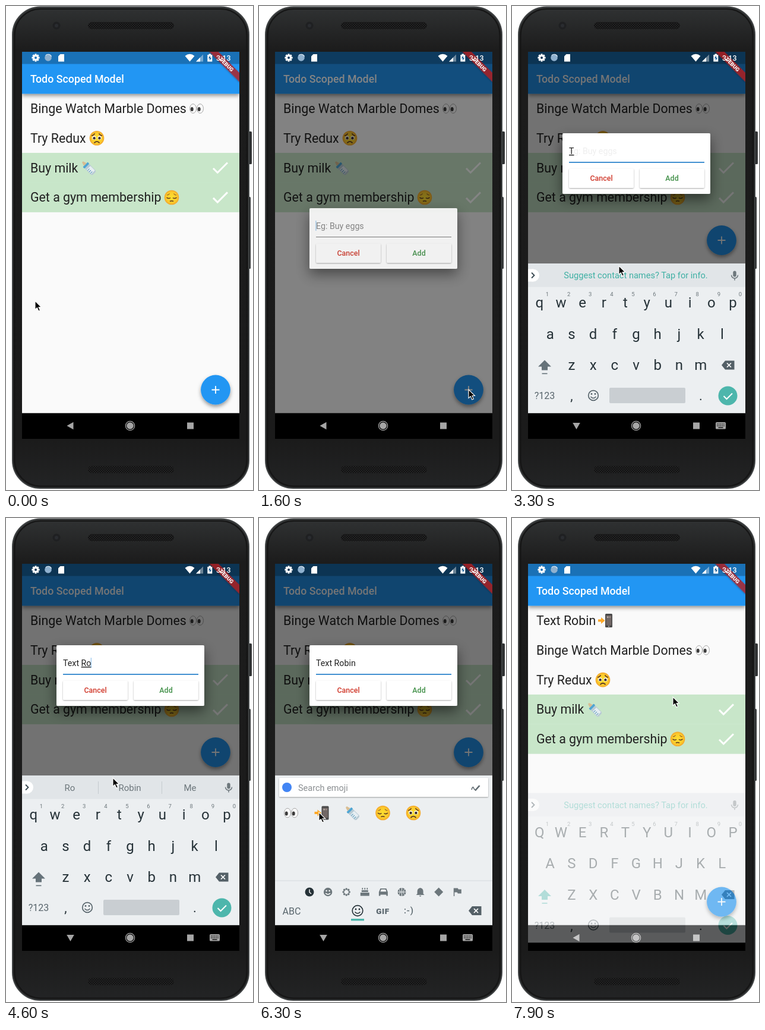
Write an HTML page that moves like this. It is 416 px wide and 814 px high and loops after 8 s.

```html
<!DOCTYPE html>
<html lang="en">
<head>
<meta charset="utf-8">
<title>Todo app</title>
<style>
html, body { margin: 0; width: 100%; height: 100%; overflow: hidden; background: #fff; }
svg { display: block; width: 416px; height: 814px; font-family: Roboto, sans-serif; }
text { white-space: pre; }
.mid { text-anchor: middle; }
.bold { font-weight: 500; }
</style>
</head>
<body>
<svg id="stage" viewBox="0 0 416 814" xmlns="http://www.w3.org/2000/svg"></svg>
<script>
const LOOP = 8000;
const NAME = 'Robin';
const ROW = 49.82;
const KEYS_Y = [507, 559.5, 612];
const INK = '#263238';
const GREY = '#6d777c';

const label = (x, y, size, fill, str, extra = '') =>
  `<text x="${x}" y="${y}" font-size="${size}" fill="${fill}" ${extra}>${str}</text>`;
const rect = (x, y, w, h, fill, extra = '') =>
  `<rect x="${x}" y="${y}" width="${w}" height="${h}" fill="${fill}" ${extra}/>`;
const disc = (x, y, r, fill, extra = '') =>
  `<circle cx="${x}" cy="${y}" r="${r}" fill="${fill}" ${extra}/>`;
const line = (d, color, width, extra = '') =>
  `<path d="${d}" fill="none" stroke="${color}" stroke-width="${width}" ${extra}/>`;
const shape = (d, fill, extra = '') => `<path d="${d}" fill="${fill}" ${extra}/>`;
const at = (x, y, body, scale = 1) => `<g transform="translate(${x} ${y}) scale(${scale})">${body}</g>`;
const group = (id, body, extra = '') => `<g id="${id}" ${extra}>${body}</g>`;
const mid = 'class="mid"';

// Emoji, each about 24 px wide around its own centre
const face = disc(0, 0, 12.3, 'url(#skin)');
const eyeball = x => `<ellipse cx="${x}" rx="5.5" ry="7.8" fill="#fafafa" stroke="#a8a8a8" stroke-width="1"/>
  <ellipse cx="${x - 1.8}" cy="1" rx="2.5" ry="3.5" fill="#3b3b3b"/>`;
const emoji = {
  eyes: eyeball(-6) + eyeball(6),
  worried: face + disc(-4.6, -.5, 3.2, '#fff') + disc(4.6, -.5, 3.2, '#fff') + disc(-4.4, 0, 2.2, '#402f2c')
    + disc(4.4, 0, 2.2, '#402f2c') + line('M-9-4 Q-5-5-3.5-8 M9-4 Q5-5 3.5-8', '#6d4022', 1.6)
    + line('M-4.5 8 Q0 3.2 4.5 8', '#5b3a24', 1.9),
  pensive: face + line('M-8.5 0 Q-5 3-2 .5 M8.5 0 Q5 3 2 .5', '#5b3a24', 1.5)
    + line('M-8-4 Q-5-4-3.5-6.5 M8-4 Q5-4 3.5-6.5', '#8d5a24', 1.1) + line('M-3 6.5 Q0 5 3 6.5', '#5b3a24', 1.6),
  bottle: '<g transform="rotate(-45) scale(1.12)">' + rect(-4.8, -5, 9.6, 17, '#b9cbd4', 'rx="3"')
    + rect(-4, 0, 8, 9.5, '#e6eef2') + rect(-5.2, -7, 10.4, 3.5, '#4fa5d3', 'rx="1"')
    + shape('M-3-7 Q-2-9-1.5-12 Q0-14 1.5-12 Q2-9 3-7Z', '#d8bd92')
    + line('M-4 2h4M-4 5h4M-4 8h4', '#5f9cbc', 1) + '</g>',
  phone: rect(0, -11.5, 12, 23, '#4a4a4a', 'rx="1.5"') + rect(1.5, -8.5, 9, 16.5, '#716765')
    + rect(3, -7, 2.5, 2.5, '#b5a9a2') + rect(6.5, -7, 2.5, 2.5, '#968984')
    + disc(6, 9.7, 1, '#bbb') + shape('M-12-2h5v-3.5l6.5 5.5-6.5 5.5v-3.5h-5z', '#fda928')
};

const gear = Array.from({ length: 8 }, (_, i) => rect(-1.5, -6.6, 3, 4, '#fff', `transform="rotate(${i * 45})"`)).join('')
  + `<circle r="3.5" fill="none" stroke="#fff" stroke-width="3"/>`;

const smiley = (color, r = 8.3) => `<circle r="${r}" fill="none" stroke="${color}" stroke-width="1.7"/>`
  + disc(-3, -2.5, 1.4, color) + disc(3, -2.5, 1.4, color) + line('M-4.5 2 Q0 7 4.5 2', color, 1.6);

const backspace = shape('M-11 0 L-5-7.5 H10.5 V7.5 H-5Z', '#546067') + line('M-2-3.5 L5 3.5 M5-3.5 L-2 3.5', '#fff', 1.7);
const tickMark = shape('M-3.2 3.9L-7.4-.3-8.8 1.1-3.2 6.7 8.8-5.3 7.4-6.7z', '#fff');

const todo = ([str, icon, x, done], i) => at(0, i * ROW,
  (done ? rect(27, 147.4, 366, 50, '#c8e6c9') : '') + label(41, 180, 21.35, '#212121', str)
  + at(x, 172.5, emoji[icon]) + (done ? at(361, 172.8, tickMark, 1.48) : ''));

const todos = [
  ['Binge Watch Marble Domes', 'eyes', 321],
  ['Try Redux', 'worried', 153],
  ['Buy milk', 'bottle', 139, true],
  ['Get a gym membership', 'pensive', 279, true]
];

const phoneBody = rect(408, 211, 6, 55, '#303233', 'rx="1.5"') + rect(408, 321, 4, 121, '#303233', 'rx="1.5"')
  + rect(11, 1.5, 398, 809.5, 'url(#case)', 'rx="47" stroke="#404344" stroke-width="2"')
  + rect(14.5, 5, 391, 802.5, 'none', 'rx="44" stroke="#151515" stroke-width="2"')
  + disc(85, 33, 6.5, '#1f2022') + disc(85, 33, 3, '#2a2c30')
  + rect(138, 27, 145, 12, 'url(#grille)', 'rx="6"') + rect(138, 773.5, 145, 12, 'url(#grille)', 'rx="6"');

const fab = disc(353, 645.5, 24.9, '#2196f3', 'filter="url(#lift)"') + line('M353 639v13M346.5 645.5h13', '#fff', 1.8);

const button = (x, str, color) => rect(x, 59.5, 109, 32.5, '#fff', 'rx="2" filter="url(#low)"')
  + label(x + 54.5, 80, 12.45, color, str, 'class="mid bold"');

const dialog = rect(85, 0, 249, 102, '#fff', 'rx="2" filter="url(#high)"')
  + label(96, 35, 14.23, '#858585', 'Eg: Buy eggs', 'id="hint"')
  + '<text x="96" y="35" font-size="14.23" fill="#212121"><tspan id="plain"></tspan><tspan id="composing" text-decoration="underline"></tspan></text>'
  + group('fieldEmoji', at(174, 30, emoji.phone, .66))
  + rect(95.3, 21, 1.2, 17, '#4d9de0', 'id="caret"')
  + rect(96, 48, 228, 1, '#777', 'id="underline"')
  + button(96, 'Cancel', '#d0392b') + button(215, 'Add', '#43914a');

const banner = `<g transform="translate(393 77) rotate(45)">`
  + rect(-36, 24.9, 72, 10.7, '#b71c1c', 'opacity=".8" filter="url(#low)"')
  + label(0, 33.5, 9, '#fff', 'DEBUG', 'class="mid" font-weight="900"') + '</g>';

const statusIcons = at(50, 87, gear) + disc(71, 87, 5.8, '#8fb1cf') + line('M66.5 83.5 A5.8 5.8 0 0 1 76.5 85', '#dce8f3', 1.2)
  + shape('M91.5 81h6.5v12.5h-10v-9z', '#fff')
  + shape('M301.5 84 Q309.5 77.5 317.5 84 L309.5 93.5Z', '#fff')
  + shape('M332 81.5v12h-12z', '#fff', 'opacity=".4"') + shape('M327 86.5v7h-7z', '#fff')
  + shape('M341.5 80.5h3.5v1.5h2.3v11.5h-8v-11.5h2.2z', '#fff') + shape('M344 83l-3 5h2v4l3-5h-2z', '#1b5e97')
  + label(354, 91.7, 12.45, '#fff', '3:13', 'class="bold"');

const keyRow = (chars, x, row) => [...chars].map((c, i) =>
  label(x + i * 36.2, KEYS_Y[row], 24, INK, c, mid)).join('');
const letters = convert => keyRow(convert('qwertyuiop'), 46.2, 0) + keyRow(convert('asdfghjkl'), 64.2, 1)
  + keyRow(convert('zxcvbnm'), 100.5, 2);
const shift = color => shape('M55 595.5l11 11h-6v6h-10v-6h-6z', color) + rect(50.5, 617.5, 9, 1.6, color);
const digits = [...'1234567890'].map((c, i) => label(59.5 + i * 36.1, 488, 9.5, GREY, c, mid)).join('');

const strip = rect(27, 433, 366, 39.5, '#e1e5e8') + disc(35.5, 453, 10.5, '#fff') + rect(27, 442.5, 9, 21, '#fff')
  + line('M33 448.5l4.5 4.5-4.5 4.5', '#37474f', 1.8)
  + label(208.5, 458.3, 14.6, '#3fb0a4', 'Suggest contact names? Tap for info.', 'id="notice" class="mid"')
  + group('words', [107.5, 208.5, 310].map(x => label(x, 458.5, 15, GREY, '', mid)).join('')
    + rect(155, 443, 1, 21, '#c5cbcf') + rect(262, 443, 1, 21, '#c5cbcf'))
  + rect(372.3, 445.5, 5.4, 10, GREY, 'rx="2.7"') + line('M369.5 452.5a5.5 5.5 0 0 0 11 0M375 458v3.5', GREY, 1.5);

const alphabet = strip + digits
  + group('upper', letters(s => s.toUpperCase()) + shift('#3fb0a4'))
  + group('lower', letters(s => s) + shift('#66737a'))
  + at(364, 604, backspace)
  + label(55, 661, 16, '#59666d', '?123', mid) + label(100.5, 663, 22, INK, ',', mid) + label(318, 663, 22, INK, '.', mid)
  + at(137, 655, smiley('#59666d')) + rect(164, 642, 128, 26, '#c9ced2', 'rx="2"')
  + disc(363.5, 655.5, 16, '#4db6ac') + line('M356.5 656l5 5 9.5-9.5', '#fff', 2);

const petals = Array.from({ length: 8 }, (_, i) => disc(0, -5, 1.8, GREY, `transform="rotate(${i * 45})"`)).join('');
const categories = [
  disc(0, 0, 7.5, INK) + line('M0-4.5V.5l3 2.5', '#fff', 1.4),
  disc(0, 0, 7.2, GREY) + disc(-2.5, -2, 1.2, '#fff') + disc(2.5, -2, 1.2, '#fff') + line('M-4 2Q0 6 4 2', '#fff', 1.4),
  petals,
  rect(-7.5, 1, 15, 5.5, GREY) + rect(-5.5, -3, 11, 3, GREY) + line('M-4-7v3M0-7v3M4-7v3', GREY, 1.6),
  shape('M-7.5 6.5V0l2.5-6H5l2.5 6v6.5H5V4.5H-5v2z', GREY) + shape('M-5-.7l1.5-3.6h7L5-.7z', '#fff'),
  disc(0, 0, 7, GREY) + line('M-7 0H7M0-7V7M-5-5Q0 0-5 5M5-5Q0 0 5 5', '#eceff1', 1),
  shape('M-7 5l2-2v-4q0-5 5-6q5 1 5 6v4l2 2zM-2 6h4l-2 2z', GREY),
  shape('M0-7.5L7.5 0 0 7.5-7.5 0z', GREY),
  shape('M-6-6.5H1l1 2h5v7H1l-1-2h-4.5v6.5H-6z', GREY)
];

const emojiPanel = rect(34, 437, 352, 32, '#fff', 'rx="1.5" filter="url(#low)"') + disc(47, 453, 8, '#4285f4')
  + label(66, 458.5, 14.5, '#8b8f92', 'Search emoji')
  + line('M358 457q2-7 3.5-3t2.5 2', '#5f6a70', 1.6) + line('M364 458.5l7.5-8.5', '#5f6a70', 2.6)
  + ['eyes', 'phone', 'bottle', 'pensive', 'worried'].map((e, i) => at(54 + i * 51.5, 496, emoji[e])).join('')
  + rect(27, 609.5, 366, 1, '#d5dade') + categories.map((c, i) => at(85 + i * 31.1, 629, c)).join('')
  + label(55, 667, 16, '#59666d', 'ABC', mid) + at(166, 660.5, smiley(INK, 8.8)) + rect(155, 674, 22, 3.4, '#4db6ac')
  + label(208.5, 665.5, 13.5, '#59666d', 'GIF', 'class="mid" font-weight="900" letter-spacing=".6"')
  + label(252.5, 665, 15, '#59666d', ':-)', 'class="mid bold" letter-spacing="1"') + at(364, 660.5, backspace);

const navIcons = group('back', shape('M-6 0L5-6.3V6.3z', '#fff'))
  + disc(209, 706, 5.8, '#fff') + `<circle cx="209" cy="706" r="7.6" fill="none" stroke="#fff" stroke-width="1.3"/>`
  + rect(305, 700.5, 11, 11, '#fff')
  + group('imeIcon', rect(343, 700, 17, 11.5, '#fff', 'rx="1.5"')
    + line('M345 703h13M345 706h13', '#111', 1.5, 'stroke-dasharray="1.5 1.3"') + line('M347.5 709h8', '#111', 1.4));

const shadow = (id, dy, blur, alpha) => `<filter id="${id}" x="-40%" y="-60%" width="180%" height="220%">
  <feDropShadow dx="0" dy="${dy}" stdDeviation="${blur}" flood-opacity="${alpha}"/></filter>`;

const stage = document.getElementById('stage');
stage.innerHTML = `<defs>
  <clipPath id="screen"><rect x="27" y="77" width="366" height="651"/></clipPath>
  <linearGradient id="case" x2="0" y2="1"><stop stop-color="#303233"/><stop offset=".09" stop-color="#1c1c1c"/>
    <stop offset=".9" stop-color="#1b1b1b"/><stop offset="1" stop-color="#232425"/></linearGradient>
  <radialGradient id="skin"><stop stop-color="#fde030"/><stop offset=".75" stop-color="#fbc92c"/><stop offset="1" stop-color="#f2a32c"/></radialGradient>
  <pattern id="grille" width="4" height="4" patternUnits="userSpaceOnUse"><path fill="#121212" d="M0 0h4v4H0z"/>
    <path fill="#2d2e2f" d="M0 0h1.5v1.5H0zM2 2h1.5v1.5H2z"/></pattern>
  ${shadow('lift', 3.5, 3, .4)}${shadow('low', 1, 1, .35)}${shadow('high', 9, 11, .5)}
  </defs>${phoneBody}
  <g clip-path="url(#screen)">
    ${rect(27, 77, 366, 651, '#fafafa')}
    ${group('oldList', todos.map(todo).join(''))}
    ${group('newList', [['Text ' + NAME, 'phone', 157], ...todos].map(todo).join(''))}
    ${rect(27, 77, 366, 70.6, '#2196f3', 'filter="url(#lift)"')}${rect(27, 77, 366, 20.5, '#000', 'opacity=".25"')}
    ${label(41, 129, 17.8, '#fff', 'Todo Scoped Model', 'class="bold"')}
    ${group('fab', fab)}
    ${rect(27, 77, 366, 608, '#000', 'id="scrim"')}
    ${group('dialog', dialog)}
    ${banner}${statusIcons}
    ${rect(27, 684.7, 366, 44, '#000')}
    ${group('keyboard', rect(27, 433, 366, 251.7, '#eceff1') + group('alphabet', alphabet) + group('emojiPanel', emojiPanel))}
    ${group('nav', navIcons, 'opacity=".65"')}
  </g>
  ${group('pointer', shape('M0 0V14.5L3.4 11.4 5.8 17 8.4 15.9 6 10.5H10.5Z', '#000', 'stroke="#fff" stroke-width="1.1"'))}`;

const ui = Object.fromEntries([...stage.querySelectorAll('[id]')].map(el => [el.id, el]));
const wordSlots = ui.words.querySelectorAll('text');

const show = (el, on) => el.setAttribute('display', on ? 'inline' : 'none');
const move = (el, x, y) => el.setAttribute('transform', `translate(${x} ${y})`);
const fade = (el, v) => el.setAttribute('opacity', v);

// Interpolates rows of [time, ...values] with a smooth step
function track(rows, t) {
  const i = rows.findIndex(row => row[0] > t);
  if (i < 0) return rows[rows.length - 1].slice(1);
  if (i === 0) return rows[0].slice(1);
  const a = rows[i - 1], b = rows[i];
  const p = (t - a[0]) / (b[0] - a[0]);
  const k = p * p * (3 - 2 * p);
  return a.slice(1).map((v, n) => v + (b[n + 1] - v) * k);
}

const pointerPath = [[100, 49, 496], [900, 353, 645], [1700, 353, 645], [2000, 222, 533], [2400, 180, 437],
  [4900, 180, 437], [5400, 137, 651], [5700, 137, 651], [6200, 101, 495], [6600, 101, 495], [7200, 269, 285],
  [7500, 269, 285], [7900, 271, 301]];
const dialogPath = [[1400, 0, 340], [1650, 1, 340], [1900, 1, 340], [2042, 1, 214], [7500, 1, 214], [7700, 0, 214]];
const keyboardPath = [[2000, 39.5, .66], [2300, 0, 1], [7700, 0, 1], [7900, 29.5, .38], [8000, 40, .1]];

const typed = 'Text ' + NAME;
const strokes = [3200, 3500, 3700, 3900, 4100, 4400, 4600, 4800, 4900, 5100];

function suggestions(word) {
  if (!word) return ['I', 'The', 'Me'];
  return word[0] === 'T' ? [word, 'Text', 'The'] : [word, NAME, 'Me'];
}

function render(t) {
  const [px, py] = track(pointerPath, t);
  move(ui.pointer, px, py);

  const raised = t >= 1900 && t < 7700;
  show(ui.oldList, t < 7500);
  show(ui.newList, t >= 7500);
  move(ui.fab, 0, raised ? -251.5 : 0);
  ui.back.setAttribute('transform', `translate(108.5 706) rotate(${raised ? -90 : 0})`);
  show(ui.imeIcon, raised);

  const [alpha, top] = track(dialogPath, t);
  fade(ui.scrim, alpha * .54);
  fade(ui.dialog, alpha);
  move(ui.dialog, 0, top);

  const count = strokes.filter(s => s <= t).length;
  const text = typed.slice(0, count);
  const split = t < 5600 ? text.lastIndexOf(' ') + 1 : text.length;
  const word = text.slice(split);
  ui.plain.textContent = text.slice(0, split);
  ui.composing.textContent = word;
  fade(ui.hint, track([[3200, 1], [3330, 0]], t)[0]);
  show(ui.fieldEmoji, t >= 6500);
  const focused = t >= 1900;
  ui.underline.setAttribute('fill', focused ? '#2f86cc' : '#777');
  ui.underline.setAttribute('height', focused ? 1.8 : 1);
  const width = count ? ui.plain.parentNode.getComputedTextLength() : 0;
  move(ui.caret, width + (t >= 6500 ? 21 : 0), 0);
  fade(ui.caret, t % 1000 >= 500 || t % 1000 < 100 ? .6 : 0);

  const [drop, solid] = track(keyboardPath, t);
  show(ui.keyboard, t >= 2000);
  move(ui.keyboard, 0, drop);
  fade(ui.keyboard, solid);
  const picking = t >= 5600 && t < 7600;
  show(ui.emojiPanel, picking);
  show(ui.alphabet, !picking);
  const caps = t < 3200 || t >= 7600;
  show(ui.upper, caps);
  show(ui.lower, !caps);
  const notice = count < 2 || t >= 7600;
  show(ui.notice, notice);
  show(ui.words, !notice);
  suggestions(word).forEach((w, i) => { wordSlots[i].textContent = w; });
}

const start = performance.now();
function tick(now) {
  const t = Math.max(0, now - start) % LOOP;
  render(Math.floor(t / 100) * 100);
  requestAnimationFrame(tick);
}
render(0);
requestAnimationFrame(tick);
</script>
</body>
</html>
```
